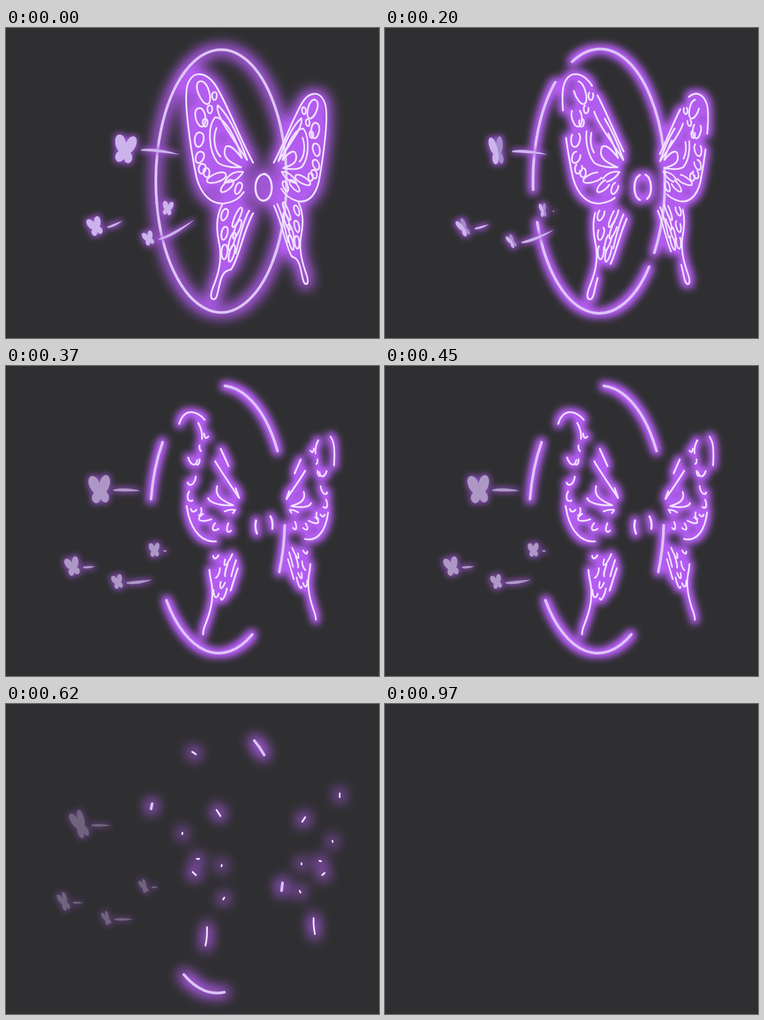
An HTML page that plays this animation: 560x465 px, repeating every 1.12 s.

```html
<!DOCTYPE html>
<html lang="en">
<head>
<meta charset="utf-8">
<title>Neon butterfly</title>
<style>
  html, body { margin: 0; width: 100%; height: 100%; overflow: hidden; background: #2f2f31; }
  svg { display: block; width: 560px; height: 465px; }
  #lines { fill: none; stroke: #f1e2ff; stroke-linecap: round; stroke-linejoin: round; }
  #ring { stroke: #dcc6f4; stroke-width: 4; }
  #left { stroke-width: 2.6; }
  #right { stroke-width: 3.1; }
  #body { stroke-width: 3; }
  .near { fill: #cdb3ec; }
  .far { fill: #a08fc8; }
</style>
</head>
<body>
<svg viewBox="0 0 560 465">
  <defs>
    <filter id="neon" filterUnits="userSpaceOnUse" x="0" y="0" width="560" height="465" color-interpolation-filters="sRGB">
      <feMorphology in="SourceAlpha" operator="dilate" radius="5"/>
      <feGaussianBlur id="blur" stdDeviation="9"/>
      <feComponentTransfer result="halo"><feFuncA type="linear" slope="1.15"/></feComponentTransfer>
      <feFlood flood-color="#b35cf0"/>
      <feComposite in2="halo" operator="in"/>
      <feMerge><feMergeNode/><feMergeNode in="SourceGraphic"/></feMerge>
    </filter>
    <filter id="soft" filterUnits="userSpaceOnUse" x="0" y="0" width="560" height="465" color-interpolation-filters="sRGB">
      <feMorphology in="SourceAlpha" operator="dilate" radius="2"/>
      <feGaussianBlur stdDeviation="5" result="halo"/>
      <feFlood flood-color="#a154d8"/>
      <feComposite in2="halo" operator="in"/>
      <feMerge><feMergeNode/><feMergeNode in="SourceGraphic"/></feMerge>
    </filter>
  </defs>
  <g id="stage">
    <g id="lines" filter="url(#neon)">
      <g id="ring"></g>
      <g id="left"></g>
      <g id="right"></g>
      <g id="body"></g>
    </g>
    <g id="flies" filter="url(#soft)"></g>
  </g>
</svg>
<script>
const LOOP = 1120;
const STEP = 125;
const LAST = 5;
const $ = id => document.getElementById(id);
const mix = (a, b, t) => a + (b - a) * t;
const strokes = [];

function add(parent, name, attrs) {
  const el = document.createElementNS('http://www.w3.org/2000/svg', name);
  for (const key in attrs) el.setAttribute(key, attrs[key]);
  return parent.appendChild(el);
}

// A line that shrinks towards the point `mid` of its length and is gone after `life` steps.
function stroke(parent, d, mid, life, drift = [0, 0], place = '') {
  const el = add(parent, 'path', { d, pathLength: 1 });
  strokes.push({ el, mid, life, drift, place });
}

// Ring: four arcs, angles in degrees
function arc(from, to, mid, life, drift) {
  const pt = deg => {
    const a = deg * Math.PI / 180;
    return `${323 + 98 * Math.cos(a)},${229.5 + 197 * Math.sin(a)}`;
  };
  stroke($('ring'), `M${pt(from)} A98,197 0 0 ${to > from ? 1 : 0} ${pt(to)}`, mid, life, drift);
}
arc(-127, -6, .5, 5.5, [0, -1]);
arc(170, 236, .54, 5.2, [-2.8, 0]);
arc(171, 32, .55, 6.3, [-1.2, 1.4]);
arc(-10, 38, .5, 5.4, [-.8, 0]);

// Body: two half ovals
stroke($('body'), 'M389,219 C370,218 370,259 387,259', .6, 4.8);
stroke($('body'), 'M387,259 C404,257 402,220 387,219', .64, 4.8, [.4, 0]);

const egg = (w, h) =>
  `M0,${-h} C${w * 1.4},${-h} ${w},${h} 0,${h} C${-w},${h} ${-w * 1.4},${-h} 0,${-h}Z`;

// Drawn as the left wing; the right wing is a skewed mirror image
function wing(parent, drift, place) {
  const line = (d, mid, life) => stroke(parent, d, mid, life, drift, place);
  let count = 0;
  const cell = (x, y, w, h, turn) => {
    const mid = .2 + count * .37 % .6;
    const life = 4.2 + count++ % 4 * .35;
    stroke(parent, egg(w, h), mid, life, drift, `${place} translate(${x} ${y}) rotate(${turn})`);
  };

  // Edge of both wings and the tail
  line('M371,202 C352,168 337,125 317,90', .6, 3.9);
  line('M317,90 C303,66 280,60 272,87 C269,102 271,125 273,142', place ? .75 : .17, 5.3);
  line('M273,142 C277,178 281,200 286,224 C293,250 308,265 328,263 C342,261 350,256 357,246', .66, 5.2);
  line('M325,264 C314,285 316,305 321,328 C324,350 319,368 312,386 C306,400 307,407 312,407 C318,406 318,392 323,376 C327,366 330,364 338,362', .41, 5.8);
  line('M338,362 C350,345 356,305 371,278', .5, 4.9);

  // Long cells that meet at the root
  line('M314,134 C302,148 304,185 318,202 C328,209 342,209 353,209 C340,203 322,196 330,178 C336,174 344,182 354,195 C346,168 330,134 314,134Z', .38, 4.4);
  line('M318,116 C314,128 330,150 362,198 C352,168 334,130 318,116Z', .27, 5.3);
  line('M316,150 C310,165 313,184 322,193', .5, 3);
  line('M328,232 C334,218 346,214 356,216 C350,226 340,232 328,232Z', .4, 4.4);

  // Chain along the outer edge, shrinking downwards
  for (let i = 0; i < 6; i++) {
    const t = i / 5;
    cell(297 - 36 * t * (1 - t) + 4 * t, 97 + 120 * Math.sin(t * Math.PI / 2),
      mix(9, 5, t), 7 + 11 * (1 - t) ** 2, -20 * Math.cos(t * 5));
  }
  // Small dots beside it, then a fan from the root
  for (let i = 0; i < 3; i++) {
    cell(313 - 7 * i, 102 + 20 * i, 4, 6, 0);
    const a = 160 - 24 * i, rad = a * Math.PI / 180, r = 49 - 7 * i;
    cell(362 + r * Math.cos(rad), 208 + r * Math.sin(rad), 7 - i, 15 - 3 * i, a - 90);
  }
  // Lower wing: a column and slanted leaves
  for (let i = 0; i < 3; i++) cell(328, 280 + 28 * i, 5, 9 + i, 20 - 8 * i);
  for (let i = 0; i < 4; i++) cell(347 - 4 * i + i % 2 * 4, 284 + 18 * i, 4, 16 - i, 24 - 3 * i);
  line('M365,274 C356,290 350,315 345,338', .45, 4.8);
}
wing($('left'), [-4, 0], '');
wing($('right'), [4, 0], 'matrix(-.793 -.124 .006 .852 694.9 75.9)');

// Small butterflies: flight from start to end, trail length, rise and bow
const WING = 'M-2,6 C-3,-10 6,-24 15,-19 C22,-13 16,1 10,5 C17,10 15,20 8,21 C2,21 -2,14 -2,6Z';
const flies = [
  { size: 1, x: [179, 111], y: [181, 180], ease: 1.15, turn: 0, trail: [58, 30], rise: 7, bow: -4 },
  { size: .66, x: [134, 87], y: [297, 296], ease: .65, turn: -28, trail: [23, 15], rise: -10, bow: 2 },
  { size: .5, x: [214, 151], y: [315, 321], ease: .6, turn: -28, trail: [54, 28], rise: -30, bow: 6 },
  { size: .5, x: [243, 207], y: [270, 273], ease: 1.15, turn: 0, trail: [0, 9], rise: 0, bow: 0 }
];
for (const fly of flies) {
  fly.tail = add($('flies'), 'path', { class: 'near' });
  fly.far = add($('flies'), 'path', { d: WING });
  fly.near = add($('flies'), 'path', { class: 'near', d: WING });
}

function drawFly(fly, step) {
  const u = step / LAST;
  const go = u ** fly.ease;
  const flap = Math.cos(step * Math.PI * 2 / 3);
  const x = mix(...fly.x, go), y = mix(...fly.y, go) + 4 * Math.sin(u * Math.PI);
  const turn = fly.turn * (1 - u) - 20 * u + 8 * flap;
  const pose = `translate(${x} ${y}) rotate(${turn}) scale(${fly.size})`;
  fly.near.setAttribute('transform', `${pose} scale(${-.72 - .2 * flap} 1)`);
  fly.far.setAttribute('transform', `${pose} scale(${.65 + .22 * flap} 1)`);
  fly.far.setAttribute('class', step === 1 || step === 2 ? 'far' : 'near');

  // Tapered trail
  const dx = mix(...fly.trail, u), dy = fly.rise * (1 - u) ** 2;
  const cx = dx * .4, cy = dy * .4 + fly.bow * (1 - u), w = Math.min(4, 1.5 + dx / 14);
  const tx = x + 7 + 17 * fly.size * (1 - u * .4);
  fly.tail.setAttribute('d', dx
    ? `M${tx},${y + 1} q${cx},${cy - w + 1} ${dx},${dy + 1} q${cx - dx},${cy + w - dy} ${-dx},${1 - dy}Z`
    : '');
}

function draw(step) {
  $('stage').style.display = step > LAST ? 'none' : '';
  if (step > LAST) return;
  // Glow is wide and faint at both ends, tight in between
  $('blur').setAttribute('stdDeviation', 5.5 + .1 * (step - 2.5) ** 4);
  $('flies').style.opacity = Math.min(1, 1.4 - .2 * step);
  for (const { el, mid, life, drift, place } of strokes) {
    const left = 1 - step / life;
    el.style.display = left > 0 ? '' : 'none';
    el.style.strokeDasharray = `${Math.max(left, 0)} 9`;
    el.style.strokeDashoffset = -mid * (1 - left);
    el.setAttribute('transform', `translate(${drift[0] * step} ${drift[1] * step}) ${place}`);
  }
  for (const fly of flies) drawFly(fly, step);
}

let shown = 0;
function tick(now) {
  // Steps alternate between 120 and 130 ms
  const step = Math.min(LAST + 1, Math.floor((now % LOOP + 5) / STEP));
  const early = step % 2 === 0 && step > 0 && now % LOOP < step * STEP;
  const next = early ? step - 1 : step;
  if (next !== shown) draw(shown = next);
  requestAnimationFrame(tick);
}
draw(0);
requestAnimationFrame(tick);
</script>
</body>
</html>
```
